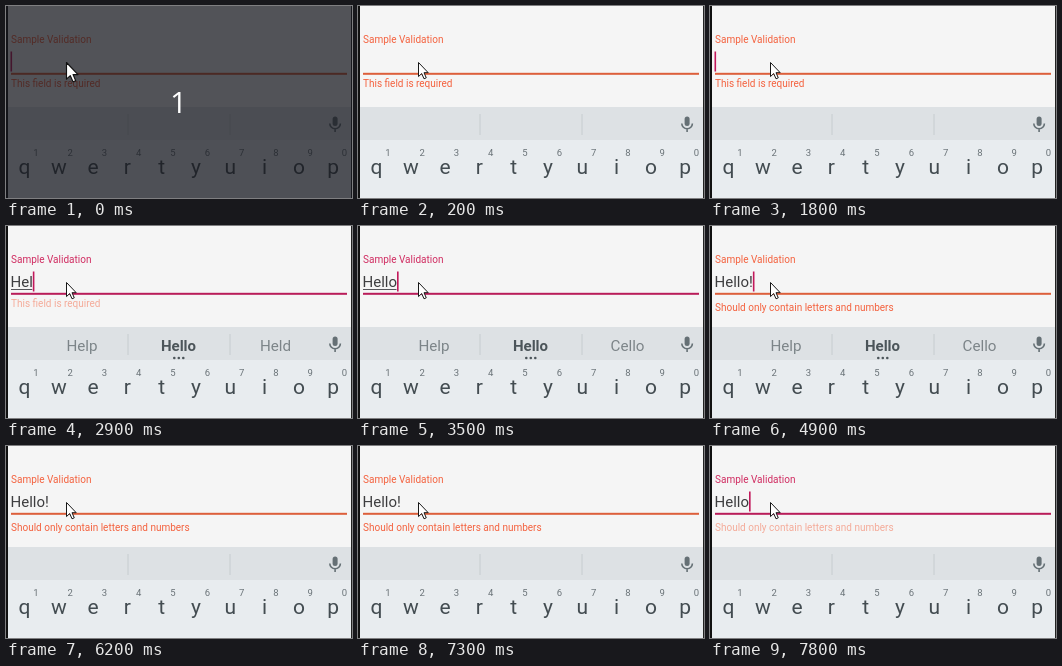
Write an HTML page that moves like this. It is 346 px wide and 192 px high and loops after 8000 ms.

```html
<!DOCTYPE html>
<html lang="en">
<head>
<meta charset="utf-8">
<title>Field validation</title>
<style>
  html, body { margin: 0; width: 100%; height: 100%; overflow: hidden; background: #f5f5f5; }
  svg { display: block; width: 100vw; height: 100vh; font-family: Roboto, sans-serif; }
  text { white-space: pre; }
  .small { font-size: 10px; }
  .field { font-size: 15px; fill: #3d3d3f; }
  .hints text { font-size: 15.2px; fill: #7c8488; text-anchor: middle; }
  .hints .best { font-weight: 700; font-size: 15px; fill: #4c555a; }
  .keys { text-anchor: middle; }
  .letter { font-size: 21px; fill: #434c51; }
  .digit { font-size: 9.5px; fill: #697277; }
  .count { font: 30px "Open Sans", sans-serif; fill: #fff; text-anchor: middle; }
</style>
</head>
<body>
<svg viewBox="0 0 346 192">
  <rect width="346" height="192" fill="#f5f5f5"/>
  <text id="label" class="small" x="5" y="37">Sample Validation</text>
  <text id="input" class="field" x="4.5" y="61"></text>
  <rect id="composing" x="5" y="63" height="1" fill="#55555a"/>
  <rect id="caret" y="45.5" width="1.6" height="20" fill="#c2185b"/>
  <rect id="line" x="5" y="66.8" width="336" height="2"/>
  <text id="error" class="small" x="5" fill="#f4623f"></text>

  <rect y="101" width="346" height="33" fill="#dde1e4"/>
  <rect y="134" width="346" height="58" fill="#e8ecef"/>
  <path d="M122 108V129M224 108V129" stroke="#c6cccf"/>
  <g class="hints">
    <text x="76" y="124.5"></text>
    <text x="172.5" y="124.5" class="best"></text>
    <text x="269.5" y="124.5"></text>
  </g>
  <g id="dots" fill="#4c555a">
    <circle cx="168.3" cy="132" r="1.3"/><circle cx="172.8" cy="132" r="1.3"/><circle cx="177.3" cy="132" r="1.3"/>
  </g>
  <g fill="none" stroke="#657075" stroke-width="1.6">
    <rect x="326.6" y="110.5" width="5" height="9.5" rx="2.5" fill="#657075" stroke="none"/>
    <path d="M323.8 117.5a5.3 5.3 0 0 0 10.6 0M329.1 122.5V126"/>
  </g>
  <g id="keys" class="keys"></g>
  <path d="M1 0V192" stroke="#111" stroke-width="2"/>
  <path d="M345.5 0V192" stroke="#222"/>

  <g id="countdown">
    <rect width="346" height="192" fill="#14161c" opacity=".72"/>
    <text class="count" x="172.5" y="107">1</text>
  </g>
  <path id="pointer" d="M0 0V14.5L3.3 11.4L5.7 16.8L8 15.8L5.7 10.5H10Z" fill="#fff" stroke="#111" stroke-linejoin="round"/>
</svg>
<script>
const LOOP = 8000;
const ORANGE = '#f4623f', ORANGE_LINE = '#dd5f3b', CRIMSON = '#d02c61', CRIMSON_LINE = '#b91c59';
const REQUIRED = 'This field is required';
const CHARSET = 'Should only contain letters and numbers';
const $ = id => document.getElementById(id);

// Each track lists [start in ms, value]; a value holds until the next start.
const typed = [[0, ''], [2000, 'H'], [2500, 'He'], [2900, 'Hel'], [3200, 'Hell'], [3500, 'Hello'],
  [4700, 'Hello!'], [7000, 'Hello! '], [7600, 'Hello!'], [7800, 'Hello']];
const caretOn = [[0, 1], [200, 0], [700, 1], [1200, 0], [1800, 1], [4000, 0], [4500, 1],
  [5200, 0], [5700, 1], [6200, 0], [6700, 1], [7300, 0], [7600, 1]];
const hints = [[0, '  '], [2100, 'Ha H He'], [2500, 'Hey He Her'], [2900, 'Help Hello Held'],
  [3500, 'Help Hello Cello'], [5000, '  ']];
const dotsOn = [[0, 0], [2200, 1], [5000, 0]];
const invalid = [[0, 1], [2900, 0], [4700, 1], [7800, 0]];
const errorAlpha = [[0, 1], [2900, .5], [3000, .2], [3100, 0], [4700, .35], [4800, .75], [4900, 1], [7800, .5]];

const at = (track, t) => track.findLast(([start]) => start <= t)[1];
const show = (el, on) => el.setAttribute('visibility', on ? 'visible' : 'hidden');

function addKey(cls, x, y, char) {
  const key = document.createElementNS('http://www.w3.org/2000/svg', 'text');
  key.setAttribute('class', cls);
  key.setAttribute('x', x);
  key.setAttribute('y', y);
  key.textContent = char;
  $('keys').append(key);
}
[...'qwertyuiop'].forEach((char, i) => {
  const x = 18.5 + i * 34.3;
  addKey('letter', x, 167.5, char);
  addKey('digit', x + 11.3, 149.5, (i + 1) % 10);
});
const hintTexts = document.querySelectorAll('.hints text');

function draw(t) {
  const text = at(typed, t), bad = at(invalid, t);
  $('input').textContent = text;
  const width = text ? $('input').getComputedTextLength() : 0;
  $('caret').setAttribute('x', 4.5 + width);
  show($('caret'), at(caretOn, t));
  $('composing').setAttribute('width', Math.max(0, width - 1));
  show($('composing'), text && t < 4700);

  $('label').setAttribute('fill', bad ? ORANGE : CRIMSON);
  $('line').setAttribute('fill', bad ? ORANGE_LINE : CRIMSON_LINE);
  const empty = t < 4000;
  $('error').textContent = empty ? REQUIRED : CHARSET;
  $('error').setAttribute('y', empty ? 81 : 85);
  $('error').setAttribute('opacity', at(errorAlpha, t));

  at(hints, t).split(' ').forEach((word, i) => { hintTexts[i].textContent = word; });
  show($('dots'), at(dotsOn, t));

  const counting = t < 200;
  show($('countdown'), counting);
  $('pointer').setAttribute('transform', `translate(60.5 56.5) scale(${counting ? 1.15 : .97})`);
}

const begin = performance.now();
function tick() {
  draw((performance.now() - begin) % LOOP);
  requestAnimationFrame(tick);
}
tick();
</script>
</body>
</html>
```
